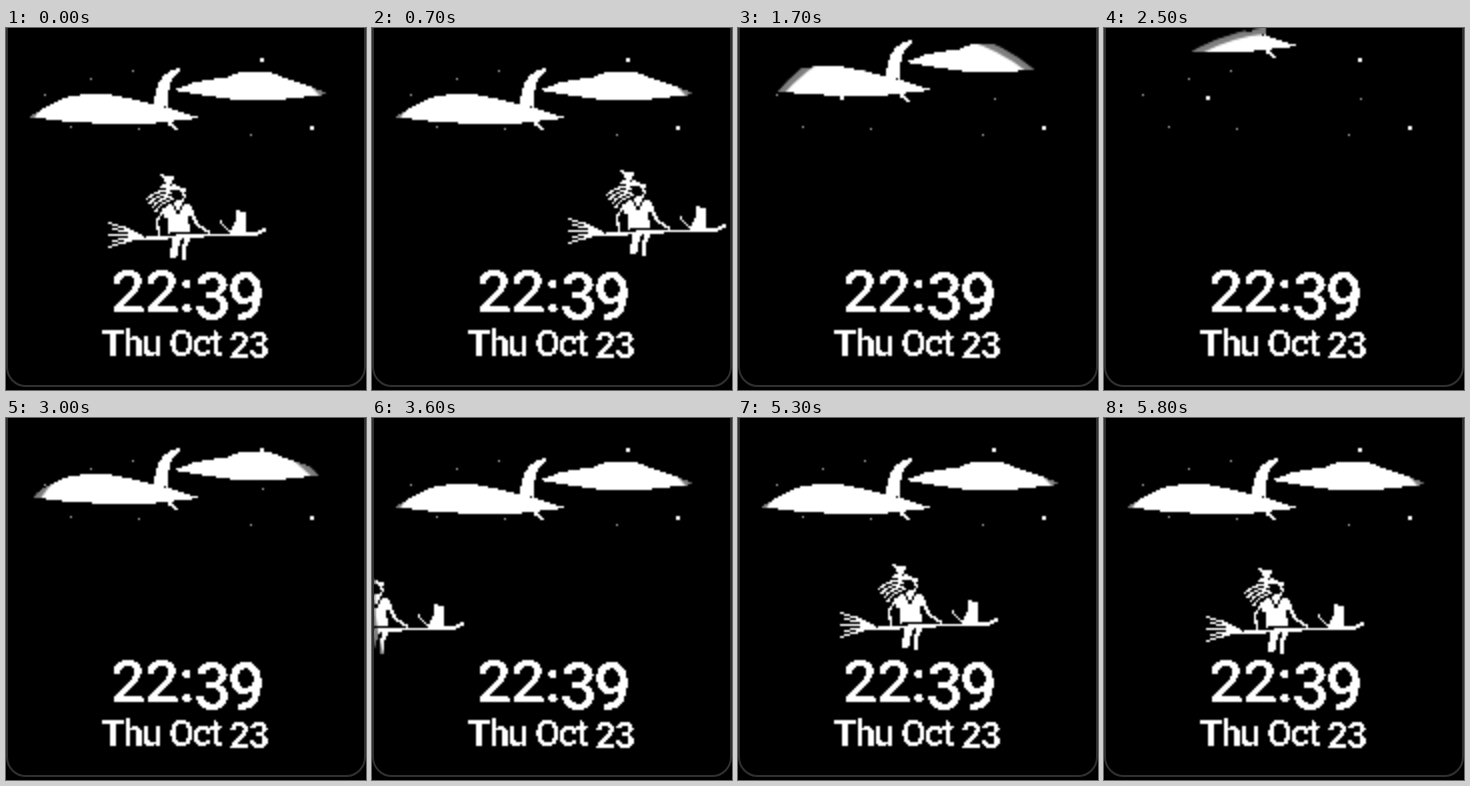
Write an HTML page with a canvas that moves like this. It is 360 by 362 pixels and loops after 6.2 s.

```html
<!DOCTYPE html>
<html lang="en">
<head>
<meta charset="utf-8">
<title>Night flight clock</title>
<style>
  html, body { margin: 0; width: 100%; height: 100%; overflow: hidden; background: #000; }
  #stage { position: relative; width: 360px; height: 362px; overflow: hidden; background: #000; }
  canvas { position: absolute; left: 0; top: 0; width: 360px; height: 362px; }
  #rim { position: absolute; left: 0; top: -30px; width: 356px; height: 385px;
         border: 2px solid #303030; border-radius: 20px; }
</style>
</head>
<body>
<div id="stage"><canvas id="view" width="180" height="181"></canvas><div id="rim"></div></div>
<script>
const W = 180, H = 181, LOOP = 6200, TICK = 100;
const view = document.getElementById('view').getContext('2d');

// Draws in stage units at half resolution, then keeps only hard white pixels.
function sprite(draw) {
  const canvas = document.createElement('canvas');
  canvas.width = W;
  canvas.height = H;
  const g = canvas.getContext('2d');
  g.scale(.5, .5);
  g.lineJoin = 'round';
  draw(g);
  const image = g.getImageData(0, 0, W, H), d = image.data;
  for (let i = 0; i < d.length; i += 4) {
    const lit = d[i] * d[i + 3] / 255 > 115;
    d[i] = d[i + 1] = d[i + 2] = 255;
    d[i + 3] = lit ? 255 : 0;
  }
  g.putImageData(image, 0, 0);
  return canvas;
}

function fill(g, path) {
  g.fillStyle = '#fff';
  g.fill(new Path2D(path));
}

function line(g, path, width, color = '#fff') {
  g.strokeStyle = color;
  g.lineWidth = width;
  g.stroke(new Path2D(path));
}

const sky = sprite(g => {
  const leftCloud = 'M23 89L44 77 58 70 74 67 106 67 126 71 150 77 172 83 194 90 150 95 112 96 66 94Z';
  const rightCloud = 'M167 62L190 54 222 49 234 44 262 44 300 57 324 66 270 72 232 72 190 66Z';
  fill(g, 'M174 40Q148 44 148 80L162 80Q160 52 174 42Z');
  fill(g, 'M158 93L166 94 174 103 168 101Z');
  for (const cloud of [leftCloud, rightCloud]) {
    line(g, cloud, 2, '#000');
    fill(g, cloud);
  }
});

function drawBroom(g) {
  line(g, 'M132 211L206 207 250 206 260 201', 3);
  for (let i = 0; i < 5; i++) {
    const y = 195 + 6 * i;
    line(g, `M${103 + i % 2 * 4} ${y}L122 ${207 + (y - 207) * .5} 138 209`, 2);
  }
}

function drawHead(g) {
  for (let i = 0; i < 4; i++) {
    line(g, `M${164 + i} ${162 + 3 * i}Q${148 + 2 * i} ${163 + 4 * i} ${140 + 3 * i} ${172 + 4 * i}`, 2.2);
  }
  line(g, 'M177 165L179 169 175 174 169 174', 2.2);
  fill(g, 'M153 144L160 149 168 147 166 156 180 161 180 164 153 159 159 154Z');
  line(g, 'M158 155L167 157', 1.6, '#000');
}

function drawBody(g) {
  fill(g, 'M160 178L170 175 184 177 189 187 182 189 184 204 161 206 163 190 157 190Z');
  line(g, 'M167 175L172 186 177 176', 2, '#000');
  line(g, 'M186 187L192 197 204 205', 3);
  line(g, 'M158 181L151 193 153 207', 2.4);
  fill(g, 'M167 207L177 207 172 220 171 229 164 229Z');
  fill(g, 'M177 206L187 207 180 219 181 231 175 233Z');
  line(g, 'M178 209L173 227M163 206L183 205', 2, '#000');
}

function drawCat(g) {
  fill(g, 'M224 205L230 192 231 180 235 185 241 183 239 192 240 205Z');
  line(g, 'M225 204L219 200 214 192', 2);
}

const witch = sprite(g => [drawBroom, drawHead, drawBody, drawCat].forEach(part => part(g)));

const clock = sprite(g => {
  function write(text, x, y, size, spacing) {
    g.font = `500 ${size}px Roboto, sans-serif`;
    g.letterSpacing = spacing + 'px';
    g.fillText(text, x, y);
  }
  g.fillStyle = '#fff';
  write('22:', 105, 284, 60, 0);
  write('39', 188, 291, 66, -4);
  write('Thu', 96, 328, 37, -1.5);
  write('Oct', 163, 328, 37, -2);
  write('23', 223, 330, 37, -1.5);
});

const bigStars = [[256, 32], [104, 70], [306, 100]];
const smallStars = [[85, 52], [39, 67], [127, 43], [257, 71], [65, 100], [133, 102], [245, 107]];

// Both trips accelerate away before TURN and slow down into place after it.
const TURN = 2300;
const trip = (t, leave, land) =>
  Math.min(1, Math.max(0, t < TURN ? t - leave : land - t) / 1000) ** 2;

function hover(t) {
  const phase = t < TURN ? t : t - 4200;
  return -Math.round(2 * Math.sin(Math.PI * (phase - 50) / 1100));
}

function ring(inner, outer, color) {
  view.strokeStyle = color;
  view.lineWidth = outer - inner;
  view.beginPath();
  view.arc(89.5, 90.5, (inner + outer) / 2, 0, 2 * Math.PI);
  view.stroke();
}

function drawStars(stars, size, color) {
  view.fillStyle = color;
  for (const [x, y] of stars) {
    view.fillRect(Math.floor((x - size) / 2), Math.floor((y - size) / 2), size, size);
  }
}

function render(ms) {
  const t = Math.floor(ms % LOOP / TICK) * TICK;
  const skyY = -Math.round(56 * trip(t, 1200, 3300));
  const witchX = Math.round(131 * trip(t, 100, 4400)) * (t < TURN ? 1 : -1);

  view.fillStyle = '#000';
  view.fillRect(0, 0, W, H);
  view.drawImage(sky, 0, skyY);
  view.drawImage(witch, witchX, hover(t));
  ring(88, 91, 'rgba(0,0,0,.5)');
  ring(91, 141, '#000');
  drawStars(bigStars, 2, '#fff');
  drawStars(smallStars, 1, 'rgba(255,255,255,.65)');
  view.drawImage(clock, 0, 0);
}

const start = performance.now();
function frame() {
  render(performance.now() - start);
  requestAnimationFrame(frame);
}
frame();
</script>
</body>
</html>
```
